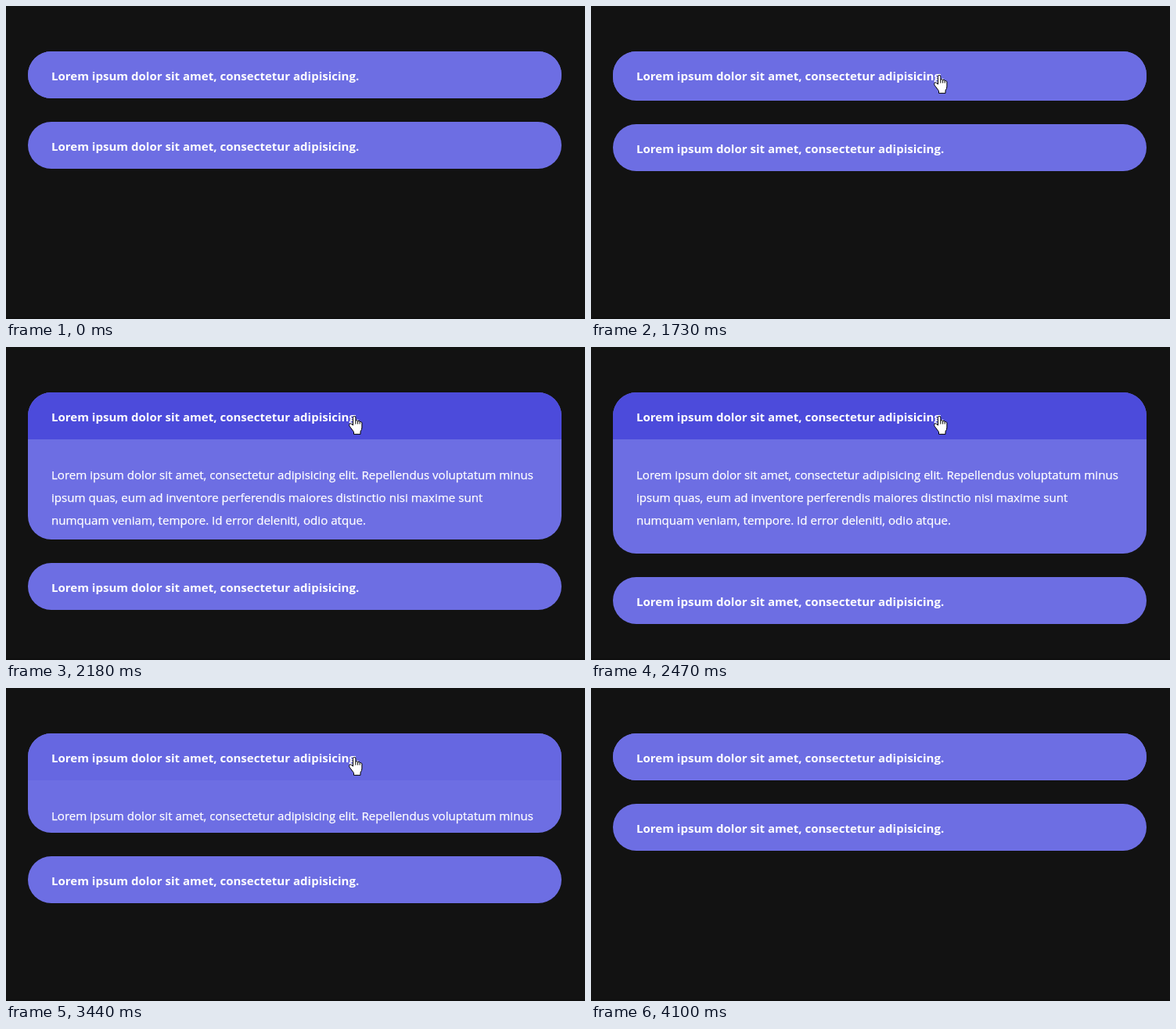
Recreate the animation shown at these times as an HTML page. Size 740 px wide and 400 px high, loop 5340 ms.

```html
<!DOCTYPE html>
<html lang="en">
<head>
<meta charset="utf-8">
<title>Accordion</title>
<style>
html, body { margin: 0; width: 100%; height: 100%; overflow: hidden; background: #121212; }
svg { display: block; }
text { font: 15.1px "Open Sans", "Noto Sans", sans-serif; fill: #fff; stroke: #fff; stroke-width: .25px; }
.title { font-size: 15.04px; font-weight: 700; stroke: none; }
.cursor path { fill: #fff; stroke: #000; stroke-linejoin: round; }
</style>
</head>
<body>
<svg width="740" height="400" viewBox="0 0 740 400">
  <defs>
    <clipPath id="cardClip"><rect id="clipBox" x="28" y="58" width="682" height="60" rx="30"/></clipPath>
  </defs>
  <rect width="740" height="400" fill="#121212"/>
  <rect y="398" width="740" height="2" fill="#0e0e0e"/>

  <rect id="card" x="28" y="58" width="682" height="60" rx="30" fill="#6d6ee3"/>
  <g clip-path="url(#cardClip)">
    <rect id="header" x="28" y="58" width="682" height="60"/>
    <text class="title" x="58" y="95">Lorem ipsum dolor sit amet, consectetur adipisicing.</text>
    <text x="58" y="169">Lorem ipsum dolor sit amet, consectetur adipisicing elit. Repellendus voluptatum minus</text>
    <text x="58" y="198">ipsum quas, eum ad inventore perferendis maiores distinctio nisi maxime sunt</text>
    <text x="58" y="227">numquam veniam, tempore. Id error deleniti, odio atque.</text>
  </g>

  <rect id="nextCard" x="28" width="682" height="60" rx="30" fill="#6d6ee3"/>
  <text id="nextTitle" class="title" x="58">Lorem ipsum dolor sit amet, consectetur adipisicing.</text>

  <g id="cursor" class="cursor">
    <path id="arrow" d="M.5 .5V16.5L4.2 13L6.6 18.5L9 17.5L6.6 12H11.6Z"/>
    <path id="hand" transform="translate(-7 0)" d="M5.5 12V2.4Q5.5 .5 7.2 .5T8.9 2.4V6.6Q9.2 5.6 10.3 5.6T11.6 7V7.3Q11.9 6.3 13 6.3T14.2 7.8V8.2Q14.5 7.5 15.4 7.5T16.9 9V15Q16.9 17.5 15 20V23.4H6.5V20.5L1.2 13.4Q0 11.2 1.2 10.2T4 10.6ZM8.9 6.6V10.5M11.6 7.3V10.5M14.2 8.2V10.5"/>
  </g>
</svg>
<script>
const LOOP = 5340;
const BODY_HEIGHT = 146.4;
const OPEN = 1701, CLOSE = 3180, CLOSE_DELAY = 9;
const LIGHT = [109, 110, 227], DARK = [76, 75, 219];
const $ = id => document.getElementById(id);
const clamp = v => Math.min(1, Math.max(0, v));
const mix = (a, b, p) => a + (b - a) * p;

// CSS "ease": cubic-bezier(.25, .1, .25, 1)
function ease(x) {
  if (x <= 0 || x >= 1) return clamp(x);
  let lo = 0, hi = 1;
  for (let i = 0; i < 24; i++) {
    const s = (lo + hi) / 2;
    if (.75 * s * (1 - s) + s ** 3 < x) lo = s; else hi = s;
  }
  const s = lo, r = 1 - s;
  return .3 * s * r * r + 3 * s * s * r + s ** 3;
}

function openness(t) {
  if (t < CLOSE) return ease((t - OPEN) / 815);
  return 1 - ease(Math.max(.023, (t - CLOSE - CLOSE_DELAY) / 802));
}

function tint(t) {
  return t < CLOSE ? ease((t - OPEN) / 520) : 1 - ease((t - CLOSE - CLOSE_DELAY) / 520);
}

// Pointer hotspot, or null while it is off stage
function pointer(t) {
  if (t < 750 || t >= 4100) return null;
  if (t < 1300) {
    const p = clamp((t - 750) / 490);
    const q = 1 - (1 - p) ** 1.6;
    return [mix(468, 446, q ** 1.8), mix(-17, 86, q)];
  }
  if (t < 3720) return [445, 88];
  const p = clamp((t - 3700) / 390) ** 1.3;
  return [mix(445, 455, p), mix(88, -18, p)];
}

function draw(t) {
  const body = BODY_HEIGHT * openness(t);
  const height = Math.round(60 + body);
  $('card').setAttribute('height', height);
  $('clipBox').setAttribute('height', height);
  $('nextCard').setAttribute('y', Math.round(148 + body));
  $('nextTitle').setAttribute('y', Math.floor(185 + body));

  const shade = tint(t);
  const rgb = LIGHT.map((c, i) => Math.round(mix(c, DARK[i], shade)));
  $('header').setAttribute('fill', `rgb(${rgb})`);

  const spot = pointer(t);
  $('cursor').style.display = spot ? '' : 'none';
  if (!spot) return;
  const [x, y] = spot.map(Math.round);
  const overCard = y >= 58;
  $('cursor').setAttribute('transform', `translate(${x} ${y})`);
  $('hand').style.display = overCard ? '' : 'none';
  $('arrow').style.display = overCard ? 'none' : '';
}

const start = performance.now();
function tick() {
  draw((performance.now() - start) % LOOP);
  requestAnimationFrame(tick);
}
tick();
</script>
</body>
</html>
```
